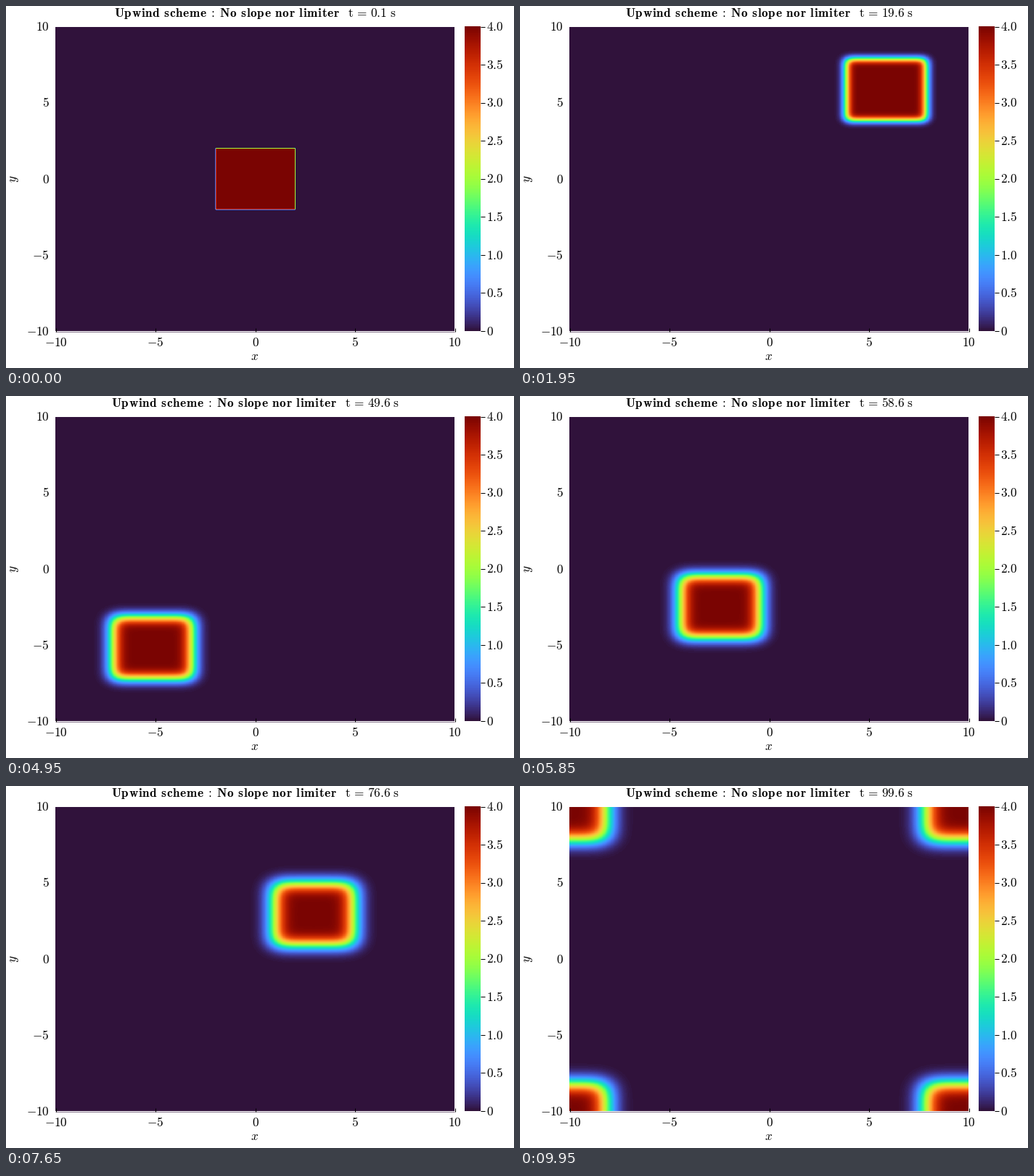
Animation, 700 px wide and 500 px high, one loop 10 s. Source, as a matplotlib script:

```python
import numpy as np
import matplotlib.pyplot as plt
from matplotlib.animation import FuncAnimation

W, H, DPI = 700, 500, 100
FRAMES, INTERVAL = 200, 50
LEFT, RIGHT, TOP, BOTTOM = 68, 618, 28, 450
BAR_LEFT, BAR_RIGHT = 632, 654
NODES = 1001
CELLS_PER_FRAME = 7.5
PEAK = 4.0
EM = 17.2
AXIS = "#8b7c90"

plt.rcParams["mathtext.fontset"] = "cm"


def advect(profile, distance, steps):
    """Move a periodic profile by distance cells with first-order upwind steps."""
    courant = distance / steps
    for _ in range(steps):
        profile = profile - courant * (profile - np.roll(profile, 1))
    return profile


def make_profiles():
    """The solution is separable, so one line profile per frame is enough."""
    index = np.arange(NODES)
    square = ((index >= 400) & (index < 600)).astype(float)
    profiles = [advect(square, 1.5, 3)]
    for _ in range(FRAMES - 1):
        profiles.append(advect(profiles[-1], CELLS_PER_FRAME, 13))
    return profiles


def sample(count):
    """Nearest node for each pixel along one side."""
    nodes = np.arange(count) * NODES / count + 0.59
    return nodes.astype(int).clip(0, NODES - 1)


PROFILES = make_profiles()
COLS = sample(RIGHT - LEFT)
ROWS = NODES - 1 - sample(BOTTOM - TOP)[1:-1]


def field(n):
    p = PROFILES[n]
    return PEAK * np.outer(p[ROWS], p[COLS])


def bold(text):
    letters = [r"\ " if c == " " else c for c in text]
    return r"\mathbf{" + r"\hspace{0.045}".join(letters) + "}"


HEADING = bold("Upwind scheme") + r"\;:\;" + bold("No slope nor limiter")


def title_text(n):
    t = 0.1 + 0.5 * n
    return (rf"${HEADING}\ \ \,\mathrm{{t}}\,=\,"
            rf"\mathrm{{{t:.1f}}}\ \mathrm{{s}}$")


fig = plt.figure(figsize=(W / DPI, H / DPI), dpi=DPI, facecolor="white")
heat = fig.figimage(field(0), LEFT, H - BOTTOM + 1, cmap="turbo",
                    vmin=0, vmax=PEAK, origin="upper")
ramp = np.linspace(PEAK, 0, BOTTOM - 1 - TOP)[:, None]
fig.figimage(np.repeat(ramp, BAR_RIGHT - BAR_LEFT, axis=1), BAR_LEFT,
             H - BOTTOM + 1, cmap="turbo", vmin=0, vmax=PEAK, origin="upper")

ax = fig.add_axes([0, 0, 1, 1], zorder=1)
ax.set_xlim(0, W)
ax.set_ylim(H, 0)
ax.axis("off")


def label(x, y, text, **kw):
    return ax.text(x, y, text, fontsize=EM * 72 / DPI, color="black", **kw)


def line(xs, ys, color="black"):
    ax.plot(xs, ys, color=color, lw=0.72, solid_capstyle="butt")


x_axis = BOTTOM - 0.5
line([LEFT, RIGHT], [x_axis, x_axis], AXIS)
for value in range(-10, 11, 5):
    x = 343.5 + 27.5 * value
    y = 239 - 21.05 * value
    line([x, x], [BOTTOM, BOTTOM - 5])
    label(x, 470.5, f"${value}$", ha="center", va="baseline")
    label(59.5, y + 5.7, f"${value}$", ha="right", va="baseline")

for k in range(9):
    y = 449 - k * 420.5 / 8
    line([BAR_RIGHT, BAR_RIGHT + 5.5], [y, y])
    label(662, y + 5.7, f"${k / 2:.1f}$" if k else "$0$",
          ha="left", va="baseline")

label(342.5, 489, "$x$", ha="center", va="baseline")
label(11, 239, "$y$", ha="center", va="center", rotation=90)
title = label(343.5, 15, title_text(0), ha="center", va="baseline")


def update(n):
    heat.set_data(field(n))
    title.set_text(title_text(n))
    return heat, title


anim = FuncAnimation(fig, update, frames=FRAMES, interval=INTERVAL,
                     repeat=True, repeat_delay=0, blit=False)
plt.show()
```
